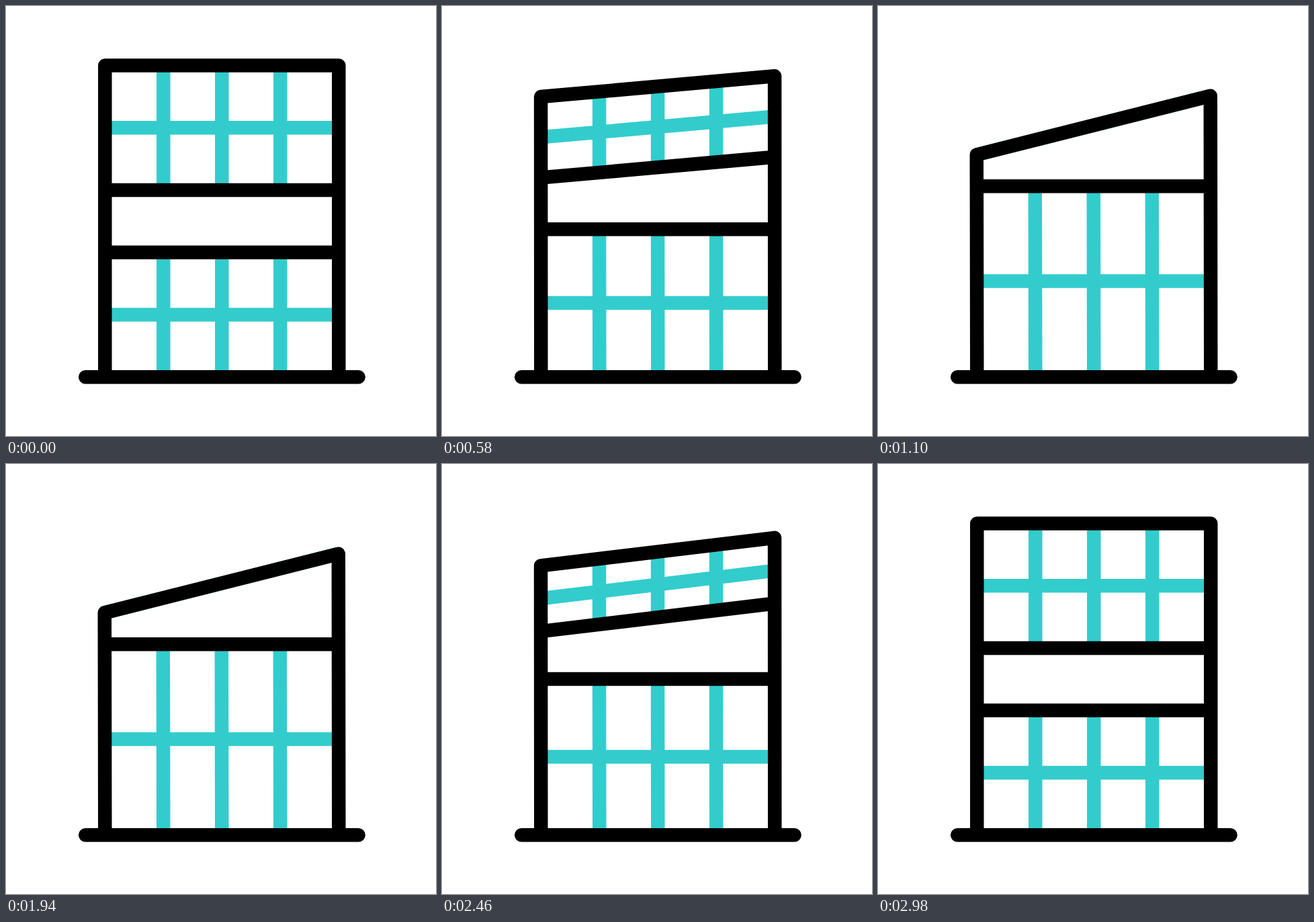
Animation of 640 by 640 pixels, one loop 3600 ms. Source, as an HTML page:

```html
<!DOCTYPE html>
<html lang="en">
<head>
<meta charset="utf-8">
<title>Building</title>
<style>
  html, body { margin: 0; height: 100%; overflow: hidden; background: #fff; }
  svg { display: block; width: 100%; height: 100%; }
  path { fill: none; stroke: #000; stroke-width: 20.5; stroke-linejoin: round; }
  .morph { d: var(--tall); animation: morph 3600ms cubic-bezier(.5, 0, .5, 1) infinite; }
  .ground { stroke-linecap: round; }

  /* Both shapes list the same points, so they blend point by point. */
  .panes {
    stroke: #3cc;
    --tall: path("M147.3 181.2L495.3 181.2 M234.3 88.4L234.3 274 M321.3 88.4L321.3 274 M408.3 88.4L408.3 274 M147.3 459.6L495.3 459.6 M234.3 366.8L234.3 552.3 M321.3 366.8L321.3 552.3 M408.3 366.8L408.3 552.3");
    --low: path("M146.8 221.4L494.8 133.7 M233.8 199.5L233.8 199.5 M320.8 177.6L320.8 177.6 M407.8 155.6L407.8 155.6 M146.8 409.5L494.8 409.5 M233.8 268.2L234.3 552.3 M320.8 268.2L321.3 552.3 M407.8 268.2L408.3 552.3");
  }
  .frame {
    --tall: path("M147.3 552.3L147.3 88.4L495.3 88.4L495.3 552.3 M147.3 274L495.3 274 M147.3 366.8L495.3 366.8");
    --low: path("M147.3 552.3L146.8 221.4L494.8 133.7L495.3 552.3 M146.8 221.4L494.8 133.7 M146.8 268.2L494.8 268.2");
  }

  @keyframes morph {
    0%, 5.5556% { d: var(--tall); }
    30.5556%, 53.1667% { d: var(--low); }
    82.7778%, 100% { d: var(--tall); }
  }
</style>
</head>
<body>
<svg viewBox="0 0 640 640">
  <path class="morph panes"/>
  <path class="morph frame"/>
  <path class="ground" d="M118.2 552.3H524.6"/>
</svg>
</body>
</html>
```
